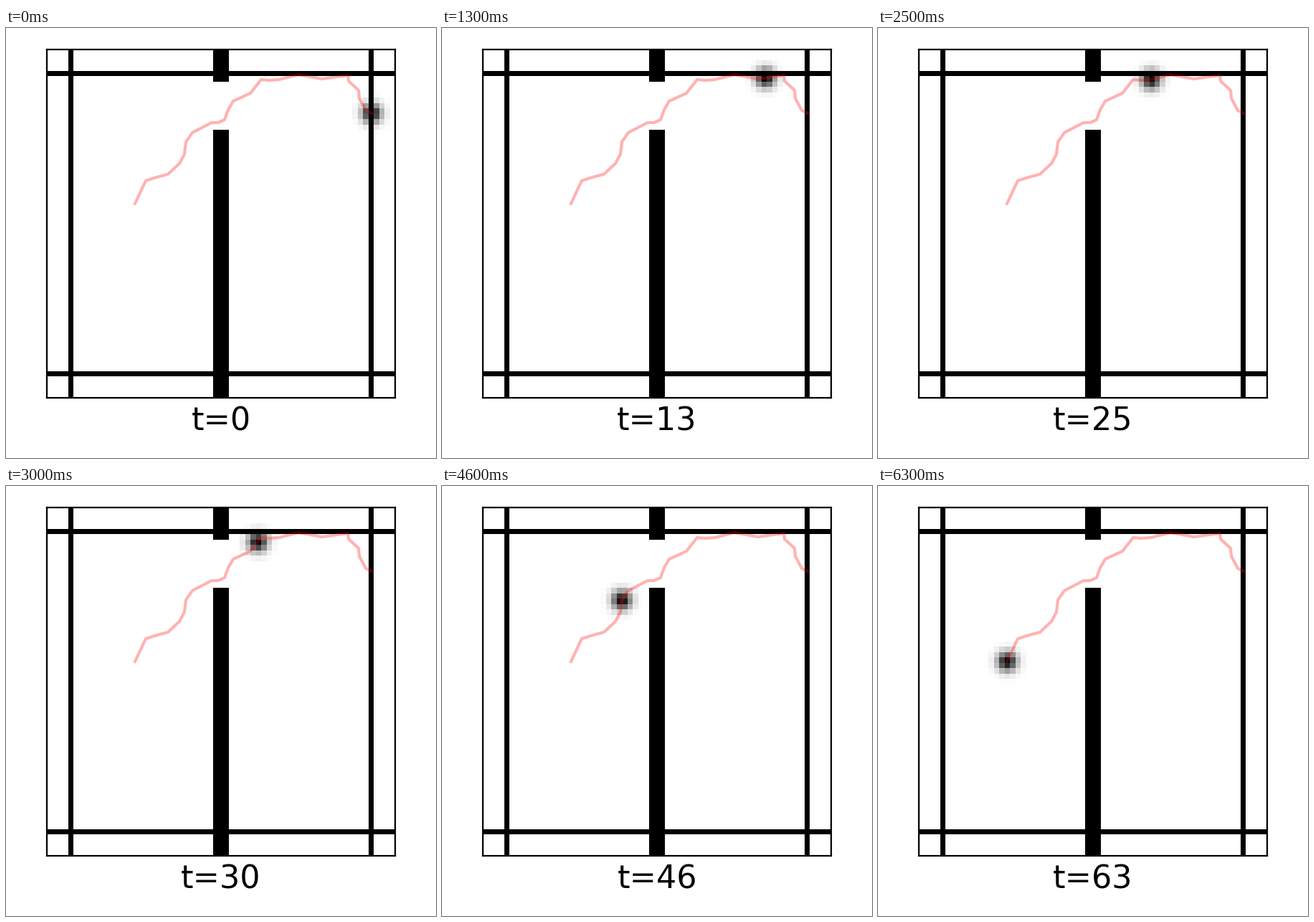
Animation, 600 px wide and 600 px high, one loop 6400 ms. Source, as a matplotlib script:

```python
import numpy as np
import matplotlib.pyplot as plt
from matplotlib.animation import FuncAnimation

SIZE, DPI = 600, 200
LEFT, TOP, SIDE = 57, 30, 486   # plot square in pixels from the top left
CELLS = 65
STEPS = 64
SPREAD = 3.2                    # blob falls off as exp(-d^2 / SPREAD)

# Turning points of the walk: step, x, y in stage pixels
TURNS = [
    (0, 510, 119), (1, 502, 115), (4, 493, 98), (5, 492, 87), (7, 478, 74),
    (8, 477, 66), (15, 441, 71), (21, 408, 65), (25, 381, 72), (28, 367, 73),
    (29, 356, 72), (32, 341, 91), (35, 317, 102), (37, 310, 114),
    (39, 305, 128), (40, 296, 132), (41, 287, 132), (44, 260, 146),
    (46, 251, 159), (48, 249, 176), (51, 242, 189), (54, 226, 204),
    (56, 211, 208), (58, 195, 213), (63, 180, 245),
]


def make_path():
    """Walk evenly between turning points, in grid coordinates."""
    when, x, y = np.transpose(TURNS)
    steps = np.arange(STEPS)
    pixels = np.column_stack([np.interp(steps, when, x),
                              np.interp(steps, when, y)])
    return (pixels - (LEFT, TOP)) / SIDE * CELLS - 0.5


def make_walls():
    walls = np.zeros((CELLS, CELLS))
    walls[[4, 60], :] = 1
    walls[:, [4, 60]] = 1
    walls[:6, 31:34] = 1
    walls[15:, 31:34] = 1
    return walls


def scene(step):
    """Walls plus a soft blob around the current position."""
    x, y = path[step]
    dist2 = (cols - x) ** 2 + (rows - y) ** 2
    return np.clip(walls + np.exp(-dist2 / SPREAD), 0, 1)


rows, cols = np.mgrid[:CELLS, :CELLS]
walls = make_walls()
path = make_path()

fig = plt.figure(figsize=(SIZE / DPI, SIZE / DPI), dpi=DPI, facecolor="white")
ax = fig.add_axes([LEFT / SIZE, 1 - (TOP + SIDE) / SIZE,
                   SIDE / SIZE, SIDE / SIZE])
image = ax.imshow(scene(0), cmap="binary", vmin=0, vmax=1,
                  interpolation="nearest", aspect="auto")
ax.plot(path[:, 0], path[:, 1], color="red", alpha=0.3, lw=1.5)
ax.set_xlim(-0.5, CELLS - 0.5)
ax.set_ylim(CELLS - 0.5, -0.5)
ax.set_xticks([])
ax.set_yticks([])
label = ax.set_xlabel("t=0", fontsize=16, family="DejaVu Sans")


def update(step):
    image.set_data(scene(step))
    label.set_text(f"t={step}")
    return image, label


anim = FuncAnimation(fig, update, frames=STEPS, interval=100,
                     repeat=True, repeat_delay=0, blit=False)
plt.show()
```
